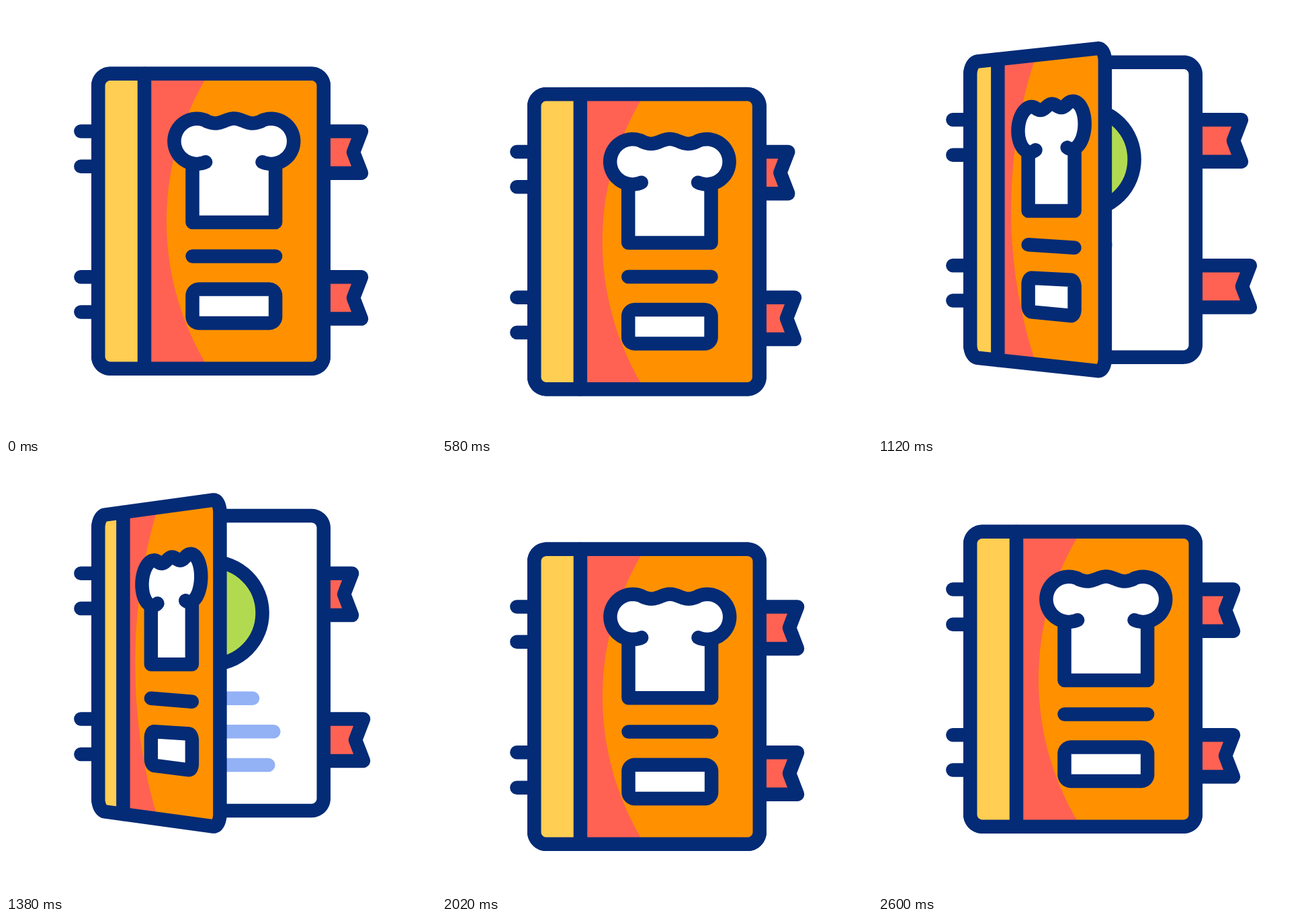
These frames come from a looping animation (640x640 px, 2800 ms). An HTML page with a canvas:

```html
<!DOCTYPE html>
<html lang="en">
<head>
<meta charset="utf-8">
<title>Recipe book</title>
<style>
  html, body { margin: 0; width: 100%; height: 100%; overflow: hidden; background: #fff; }
  canvas { display: block; width: 640px; height: 640px; }
</style>
</head>
<body>
<canvas id="stage" width="640" height="640"></canvas>
<script>
const ctx = document.getElementById('stage').getContext('2d');
const LOOP = 2800, STEP = 20, LINE = 20.5;
const NAVY = '#042b76', CORAL = '#ff6252', ORANGE = '#ff9100', YELLOW = '#ffce52',
      GREEN = '#b2da51', BLUE = '#93b1f5', WHITE = '#fff';

// Monotone cubic through [time, value] keys; flat at peaks and at both ends.
function track(...keys) {
  const rate = i => (keys[i + 1][1] - keys[i][1]) / (keys[i + 1][0] - keys[i][0]);
  const slopes = keys.map((_, i) => {
    if (i === 0 || i === keys.length - 1) return 0;
    const a = rate(i - 1), b = rate(i);
    return a * b > 0 ? 2 * a * b / (a + b) : 0;
  });
  return t => {
    if (t <= keys[0][0]) return keys[0][1];
    const i = keys.findIndex(k => k[0] > t) - 1;
    if (i < 0) return keys[keys.length - 1][1];
    const [t0, v0] = keys[i], [t1, v1] = keys[i + 1];
    const d = t1 - t0, u = (t - t0) / d, w = 1 - u;
    return v0 * (1 + 2 * u) * w * w + v1 * u * u * (3 - 2 * u)
         + d * u * w * (slopes[i] * w - slopes[i + 1] * u);
  };
}

const bookY = track([200, 0], [480, 38.5], [580, 30.5], [740, 9], [880, -5.5], [1280, -22],
  [1380, -23.7], [1680, -26], [1900, 42], [2240, -13.5], [2600, 0]);
const coverScale = track([540, 1], [580, 0.998], [740, 0.885], [880, 0.715], [1280, 0.553],
  [1380, 0.54], [1680, 0.517], [1970, 1]);
const ribbons = [
  { y: 186.4, shift: track([200, 0], [560, -14], [960, 26], [1360, -14], [1760, 0]) },
  { y: 403.2, shift: track([480, 0], [760, -14], [1160, 26], [1560, -14], [1960, 0]) }
];
const textLines = [
  { y: 372.4, from: 243, end: track([540, 243], [1380, 367]) },
  { y: 422, from: 207, end: track([590, 207], [1460, 403]) },
  { y: 471.7, from: 207, end: track([645, 207], [1515, 403]) }
];

const LEFT = 137.25, RIGHT = 472.75, TOP = 100.7, BOTTOM = 539.7;
const MID_Y = (TOP + BOTTOM) / 2, BAND = 206, ART_X = 339.3, ART_L = 277.5, ART_R = 401.1;

function arc(cx, cy, r, from, to, n = 12) {
  return Array.from({ length: n + 1 }, (_, i) => {
    const a = (from + (to - from) * i / n) * Math.PI / 180;
    return [cx + r * Math.cos(a), cy + r * Math.sin(a)];
  });
}

function roundBox(x0, y0, x1, y1, r) {
  return [
    ...arc(x0 + r, y0 + r, r, 180, 270), ...arc(x1 - r, y0 + r, r, 270, 360),
    ...arc(x1 - r, y1 - r, r, 0, 90), ...arc(x0 + r, y1 - r, r, 90, 180)
  ];
}

const bookShape = roundBox(LEFT, TOP, RIGHT, BOTTOM, 18);
const labelShape = roundBox(ART_L, 421.6, ART_R, 471.9, 9.5);
const bodyShape = [[ART_L, 235], [ART_L, 322], [ART_R, 322], [ART_R, 235]];

const leftPuff = arc(284, 201.3, 33.6, 67, 294, 40);
const ripple = Array.from({ length: 41 }, (_, i) => {
  const x = 299 + i * (ART_X - 299) / 20;
  return [x, 171 - 3.5 * Math.cos(2 * Math.PI * (x - ART_X) / 55.6)];
});
const rightPuff = leftPuff.map(([x, y]) => [2 * ART_X - x, y]).reverse();
const hatShape = [...leftPuff, ...ripple, ...rightPuff];

const sweep = [[520, 80]];
for (let y = 80; y <= 560; y += 10) sweep.push([654 - Math.sqrt(415 ** 2 - (y - MID_Y) ** 2), y]);
sweep.push([520, 560]);

function path(points, closed) {
  ctx.beginPath();
  points.forEach(p => ctx.lineTo(...p));
  if (closed) ctx.closePath();
}

function fill(points, color) {
  path(points, true);
  ctx.fillStyle = color;
  ctx.fill();
}

function stroke(points, closed = false, color = NAVY) {
  path(points, closed);
  ctx.strokeStyle = color;
  ctx.stroke();
}

function drawRibbon({ y, shift }, t) {
  const dx = shift(t);
  const shape = [[435, y], [529 + dx, y], [517 + dx, y + 31.2], [529 + dx, y + 62.4], [435, y + 62.4]];
  fill(shape, CORAL);
  stroke(shape);
}

function drawPage(t) {
  fill(bookShape, WHITE);
  ctx.beginPath();
  ctx.arc(305.2, 245.4, 76.4, 0, 2 * Math.PI);
  ctx.fillStyle = GREEN;
  ctx.fill();
  ctx.strokeStyle = NAVY;
  ctx.stroke();
  for (const { y, from, end } of textLines) {
    const x = end(t);
    if (x > from) stroke([[from, y], [x, y]], false, BLUE);
  }
  stroke(bookShape, true);
}

function drawCover(scale) {
  const flare = 54 * (1 - scale);
  const artScale = 1 - 1.1 * (1 - scale);
  const foldX = x => LEFT + (x - LEFT) * scale;
  const fold = points => points.map(([x, y]) => [
    foldX(x),
    y + flare * (x - LEFT) / (RIGHT - LEFT) * (y - MID_Y) / (MID_Y - TOP)
  ]);
  // Artwork tilts from its own left side by a height-dependent amount.
  const tilt = (points, lift) => points.map(([x, y]) => [
    foldX(ART_X) + (x - ART_X) * artScale,
    y + flare * lift(y) * (x - ART_L) / (ART_R - ART_L)
  ]);

  const cover = fold(bookShape);
  ctx.save();
  path(cover, true);
  ctx.clip();
  fill(cover, YELLOW);
  fill(fold([[BAND, 70], [520, 70], [520, 570], [BAND, 570]]), CORAL);
  fill(fold(sweep), ORANGE);
  ctx.restore();
  stroke(cover, true);
  stroke(fold([[BAND, TOP], [BAND, BOTTOM]]));

  const hatLift = y => 0.43 * (y - 322) / 155;
  const hat = tilt(hatShape, hatLift), body = tilt(bodyShape, hatLift);
  fill(hat, WHITE);
  fill(tilt([[ART_L, 215], [ART_L, 322], [ART_R, 322], [ART_R, 215]], hatLift), WHITE);
  stroke(body);
  stroke(hat);

  stroke(tilt([[ART_L, 372.4], [ART_R, 372.4]], () => 0.2));
  const label = tilt(labelShape, y => 0.16 + 0.15 * (y - 421.6) / 50.3);
  fill(label, WHITE);
  stroke(label, true);
}

function draw(t) {
  ctx.setTransform(1, 0, 0, 1, 0, 0);
  ctx.fillStyle = WHITE;
  ctx.fillRect(0, 0, 640, 640);
  ctx.translate(0, bookY(t));
  ctx.lineWidth = LINE;
  ctx.lineCap = ctx.lineJoin = 'round';
  ribbons.forEach(r => drawRibbon(r, t));
  drawPage(t);
  for (const y of [186.4, 238.7, 403.2, 455.6]) stroke([[111.4, y], [LEFT, y]]);
  drawCover(coverScale(t));
}

const start = performance.now();
function tick() {
  const t = (performance.now() - start) % LOOP;
  draw(Math.floor(t / STEP) * STEP);
  requestAnimationFrame(tick);
}
tick();
</script>
</body>
</html>
```
